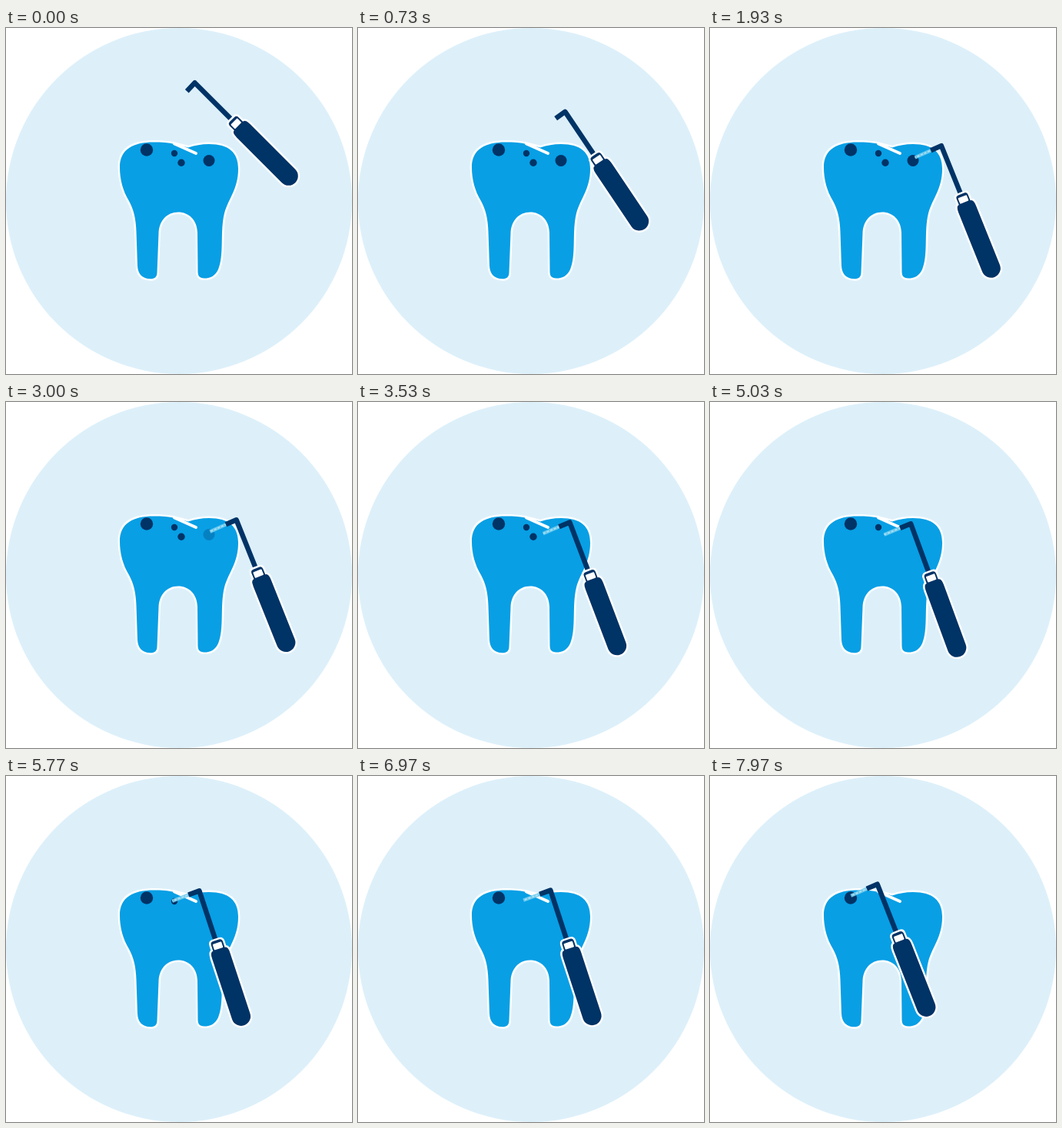
Animation, 450 px wide and 450 px high, one loop 8 s. Source, as an HTML page:

```html
<!DOCTYPE html>
<html lang="en">
<head>
<meta charset="utf-8">
<title>Tooth cleaning</title>
<style>
  html, body { margin: 0; width: 100%; height: 100%; overflow: hidden; background: #fff; }
  svg { display: block; width: 100%; height: 100%; }
</style>
</head>
<body>
<svg viewBox="0 0 450 450">
  <circle cx="225" cy="225" r="225" fill="#ddf0fa"/>

  <g stroke="#fff" stroke-linejoin="round" stroke-linecap="round">
    <path fill="#089fe5" stroke-width="5" paint-order="stroke" d="M148 181 C148 158 165 148.500 192 148.500 C203 148.500 212 149 219 151
      L237 155.500 C246 152.500 254 151 264 151 C290 151 302 162 302 183 C302 210 289 222 284 241
      C278 265 284 295 276 314 C272 323 265 325.500 258 325.500 C251 325.500 249.500 322 249.500 316
      L249 266 C248.500 250 238 239.500 224 239.500 C209 239.500 199 251 198.500 267 L196.500 318
      C196.500 324 193 326.300 188 326.300 C177 326 171.500 320 171 309 L169.500 265
      C169 248 166 236 160 225 C152 212 148 197 148 181 Z"/>
    <path fill="none" stroke-width="4" d="M219 150.500 L247 163"/>
  </g>

  <g fill="#003366">
    <circle cx="183" cy="158.500" r="8.200"/>
    <circle class="cavity" cx="264" cy="172.500" r="7.500"/>
    <circle class="cavity" cx="228" cy="175.300" r="4.700"/>
    <circle class="cavity" cx="219" cy="163" r="4.200"/>
  </g>

  <!-- Local origin: centre of the handle's rounded end -->
  <g id="tool">
    <g id="spray" fill="none">
      <path stroke="#74cdee" stroke-width="4.500" opacity=".9" d="M-14 -171.500 L-38 -170.500"/>
      <path id="drops" stroke="#b4e4f6" stroke-width="1.500" stroke-dasharray="3 2" d="M-14 -171.500 L-38 -170.500"/>
    </g>
    <path fill="none" stroke="#003366" stroke-width="6.500" stroke-linejoin="round" d="M-15.500 -171.500 L-0.500 -172 V-100"/>
    <path fill="#003366" stroke="#fff" stroke-width="5" paint-order="stroke" stroke-linejoin="round"
      d="M-12.300 0 V-83 Q-12.300 -92 -8 -92 V-100 Q-8 -104 -4 -104 H4 Q8 -104 8 -100 V-92
        Q12.300 -92 12.300 -83 V0 A12.300 12.300 0 0 1 -12.300 0 Z"/>
    <rect x="-6" y="-100.500" width="12" height="8" rx="1" fill="#fff"/>
  </g>
</svg>
<script>
  const LOOP = 8000, SPRAY_START = 1700;
  const tool = document.getElementById("tool");
  const spray = document.getElementById("spray");
  const drops = document.getElementById("drops");
  const cavities = [...document.querySelectorAll(".cavity")];

  // Handle end position and tilt, reached between start and end
  const startPose = [367.5, 192.5, 45];
  const moves = [
    { start: 0, end: 1480, pose: [364, 315, 22] },
    { start: 1700, end: 1900, pose: [365.5, 312.5, 21.9] },
    { start: 2700, end: 4200, pose: [321, 319.5, 20.2] },
    { start: 5000, end: 6050, pose: [304.5, 312, 18.1] },
    { start: 6800, end: 8100, pose: [281, 300.5, 21.5] }
  ];
  const fades = [[2600, 3150], [4300, 4900], [6050, 6600]];

  const progress = (t, start, end) => Math.min(1, Math.max(0, (t - start) / (end - start)));
  const ease = p => p < 0.5 ? 4 * p ** 3 : 1 - 4 * (1 - p) ** 3;

  function poseAt(t) {
    return moves.reduce((from, { start, end, pose }) => {
      const k = ease(progress(t, start, end));
      return from.map((v, i) => v + (pose[i] - v) * k);
    }, startPose);
  }

  function draw(now) {
    const t = now % LOOP;
    const [x, y, tilt] = poseAt(t);
    tool.setAttribute("transform", `translate(${x} ${y}) rotate(${-tilt})`);
    spray.setAttribute("opacity", progress(t, SPRAY_START, SPRAY_START + 100));
    drops.setAttribute("stroke-dashoffset", -t * 0.03);
    cavities.forEach((c, i) => c.setAttribute("opacity", 1 - progress(t, ...fades[i])));
  }

  let begin;
  function tick(now) {
    begin ??= now;
    draw(now - begin);
    requestAnimationFrame(tick);
  }
  draw(0);
  requestAnimationFrame(tick);
</script>
</body>
</html>
```
